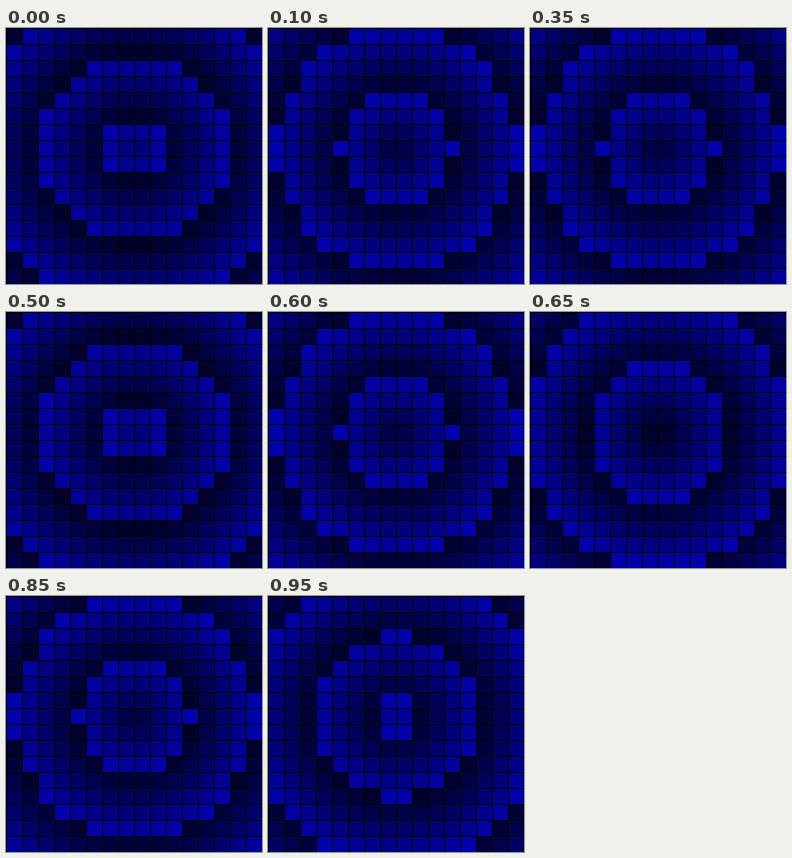
An HTML page with a canvas that plays this animation: 256 px wide and 256 px high, repeating every 1000 ms.

```html
<!DOCTYPE html>
<html>
<head>
<meta charset="utf-8">
<style>
html, body { margin: 0; height: 100%; overflow: hidden; background: #000; }
canvas { display: block; }
</style>
</head>
<body>
<canvas id="stage" width="256" height="256"></canvas>
<script>
const ctx = document.getElementById("stage").getContext("2d");
const CELL = 16, STEP_MS = 50, STEPS = 5, WAVE = 4;
const CX = 7.5, CY = 7;
const DARK = 42, BRIGHT = 172;

// Sawtooth rings: dark just outside each crest, bright just inside it.
function draw(step) {
  ctx.fillStyle = "#000";
  ctx.fillRect(0, 0, 256, 256);
  const crest = 2 + step * WAVE / STEPS;
  for (let row = 0; row < 16; row++) {
    for (let col = 0; col < 16; col++) {
      const d = Math.hypot(col - CX, row - CY) - crest;
      const level = (d + 3 * WAVE) % WAVE / WAVE;
      ctx.fillStyle = `rgb(0,0,${Math.round(DARK + (BRIGHT - DARK) * level)})`;
      ctx.fillRect(col * CELL + 1, row * CELL + 1, CELL - 1, CELL - 1);
    }
  }
}

function tick() {
  draw(Math.floor(performance.now() / STEP_MS) % STEPS);
  requestAnimationFrame(tick);
}
tick();
</script>
</body>
</html>
```
